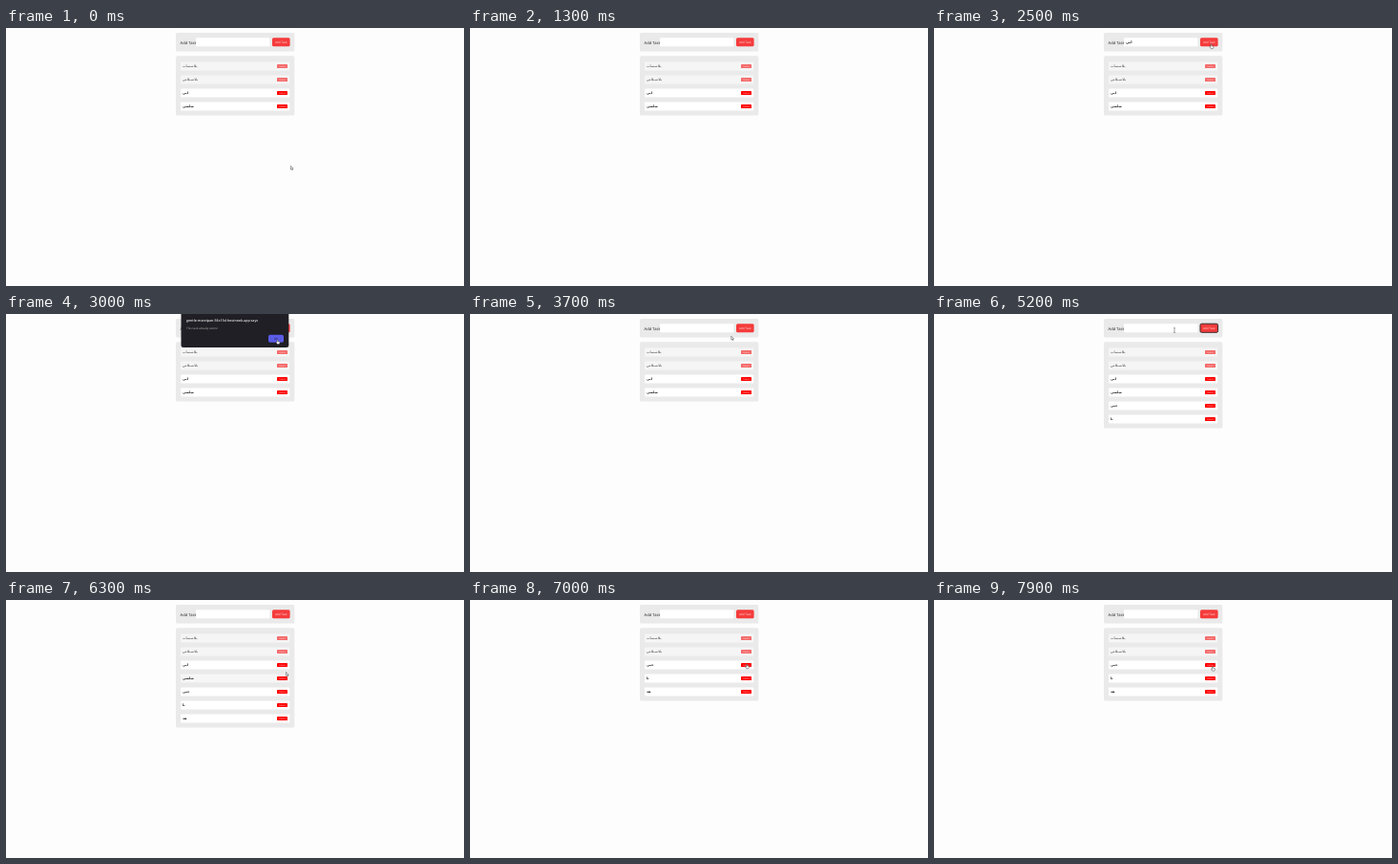
Recreate the animation shown at these times as an HTML page. Size 480 by 270 pixels, loop 8000 ms.

```html
<!DOCTYPE html>
<html lang="en">
<head>
<meta charset="utf-8">
<title>Task list</title>
<style>
html, body { margin: 0; width: 100%; height: 100%; overflow: hidden; background: #fdfdfd; }
svg { display: block; width: 100vw; height: 100vh; text-rendering: geometricPrecision; }
text { font-family: "Open Sans", "DejaVu Sans", sans-serif; }
</style>
</head>
<body>
<svg id="stage" viewBox="0 0 480 270"></svg>
<script>
const LOOP = 8000;
const stage = document.getElementById('stage');

// text, time added, time removed, done
const tasks = [
  ['بلاصصاب', 0, LOOP, true],
  ['بلاصبلاص', 0, LOOP, true],
  ['ابي', 0, 6700],
  ['صلصي', 0, 7000],
  ['حبي', 4600, LOOP],
  ['ثا', 5000, LOOP],
  ['هذ', 5700, LOOP]
];

// text, first key, time cleared
const entries = [
  ['ابي', 1500, 3300],
  ['حبي', 4300, 4600],
  ['ثا', 4800, 5000],
  ['هذ', 5400, 5700]
];

// time, x, y, pointer shape from then on
const path = [
  [0, 298.3, 144.3, 'arrow'],
  [100, 296, 138, 'arrow'],
  [400, 235, 72, 'arrow'],
  [600, 191, 26, 'arrow'],
  [700, 212, 17, 'beam'],
  [900, 243, 16.5, 'beam'],
  [1300, 243, 16.5, 'none'],
  [1800, 246, 18, 'beam'],
  [2000, 275, 21, 'arrow'],
  [2100, 286, 18, 'hand'],
  [2300, 290.5, 16.8, 'hand'],
  [2700, 290.5, 16.8, 'arrow'],
  [2900, 284.5, 26.8, 'hand'],
  [3400, 284.5, 26.8, 'arrow'],
  [3700, 273.8, 23.2, 'arrow'],
  [3900, 260, 17, 'beam'],
  [4100, 252, 17, 'beam'],
  [5800, 252, 17, 'beam'],
  [5900, 262, 29, 'arrow'],
  [6200, 292, 73, 'arrow'],
  [6300, 293.5, 75.5, 'arrow'],
  [6500, 290, 67, 'hand'],
  [7500, 290, 67, 'hand'],
  [7900, 292, 69.3, 'hand'],
  [LOOP, 292, 69.3, 'hand']
];

const ink = 'fill="#fff" stroke="#333" stroke-width=".45" stroke-linejoin="round"';
const shapes = {
  none: '',
  arrow: `<path d="M0 0V3.8L.9 3 1.5 4.4 2.2 4.1 1.6 2.8H2.8Z" ${ink}/>`,
  hand: `<path d="M-.4 .3Q0-.3 .4 .3V1.8L2.4 2.3V3.6L1.8 4.8H-.3L-1.6 2.8-1 2.4-.4 2.9Z" ${ink}/>`,
  beam: '<path d="M-.9-2.3H.9M0-2.3V2.3M-.9 2.3H.9" fill="none" stroke="#444" stroke-width=".5"/>'
};

const box = (x, y, w, h, fill, r = 0, more = '') =>
  `<rect x="${x}" y="${y}" width="${w}" height="${h}" rx="${r}" fill="${fill}" ${more}/>`;
const label = (x, y, size, fill, str, more = '') =>
  `<text x="${x}" y="${y}" font-size="${size}" fill="${fill}" ${more}>${str}</text>`;
const middle = 'text-anchor="middle"';
const bold = 'font-weight="600"';

function form(t) {
  const entry = entries.find(([, from, to]) => t >= from && t < to);
  const typed = entry ? entry[0].slice(0, 1 + (t - entry[1]) / 100) : '';
  const focus = t >= 5100 && t < 5400 ? 'stroke="#222" stroke-width=".9"' : '';
  return box(178, 5, 124.3, 19.5, '#eaeaea', 1.5) +
    label(182.6, 16.5, 4.1, '#222', 'Add Task') +
    box(199, 10.3, 77.5, 9, '#fff', 1) +
    label(201, 16.2, 3.8, '#222', typed, bold) +
    box(279, 10.2, 18.6, 9.1, '#f53b3b', 1.5, focus) +
    label(288.3, 15.9, 3.1, '#ffe3e3', 'Add Task', middle);
}

function list(t) {
  const shown = tasks.filter(([, from, to]) => t >= from && t < to);
  const rows = shown.map(([name, , , done], i) => {
    const y = 40 + 14 * i;
    const hover = i === 3 && t >= 6200 && t < 6400;
    return `<g opacity="${done ? .55 : 1}">` +
      box(183, y - 4.6, 114.3, 9.2, hover ? '#f6f6f6' : '#fff', 1) +
      label(185, y + 1.2, 3.5, '#222', name, bold) +
      box(284, y - 2.1, 11, 4.2, '#f00', .7) +
      label(289.5, y + .8, 2.2, '#ffd0d0', 'Delete', middle) + '</g>';
  });
  return box(178, 29.3, 124.3, 6.3 + 14 * shown.length, '#eaeaea', 1.5) + rows.join('');
}

function dialog(t) {
  if (t < 2700 || t >= 3400) return '';
  return '<path d="M183.5 0H296.3V32.5Q296.3 35 293.8 35H186Q183.5 35 183.5 32.5Z" fill="#1f1f25"/>' +
    label(189, 8.3, 3.6, '#eee', 'gentle-marzipan-58c13d.hostnook.app says', bold) +
    label(189, 16, 3, '#bbb', 'This task already exists!') +
    box(275, 21.7, 16, 8, '#5b5ce6', 1.8) +
    label(283, 26.8, 3, '#1c1c40', 'OK', middle);
}

function pointer(t) {
  const i = path.findIndex(p => p[0] > t);
  const [t0, x0, y0, shape] = path[i - 1];
  const [t1, x1, y1] = path[i];
  const k = (t - t0) / (t1 - t0);
  return `<g transform="translate(${x0 + (x1 - x0) * k} ${y0 + (y1 - y0) * k})">${shapes[shape]}</g>`;
}

let last = -1;
function draw(now) {
  // the screen refreshes ten times a second
  const t = Math.floor(now % LOOP / 100) * 100;
  if (t !== last) {
    stage.innerHTML = form(t) + list(t) + dialog(t) + pointer(t);
    last = t;
  }
  requestAnimationFrame(draw);
}
draw(0);
</script>
</body>
</html>
```
